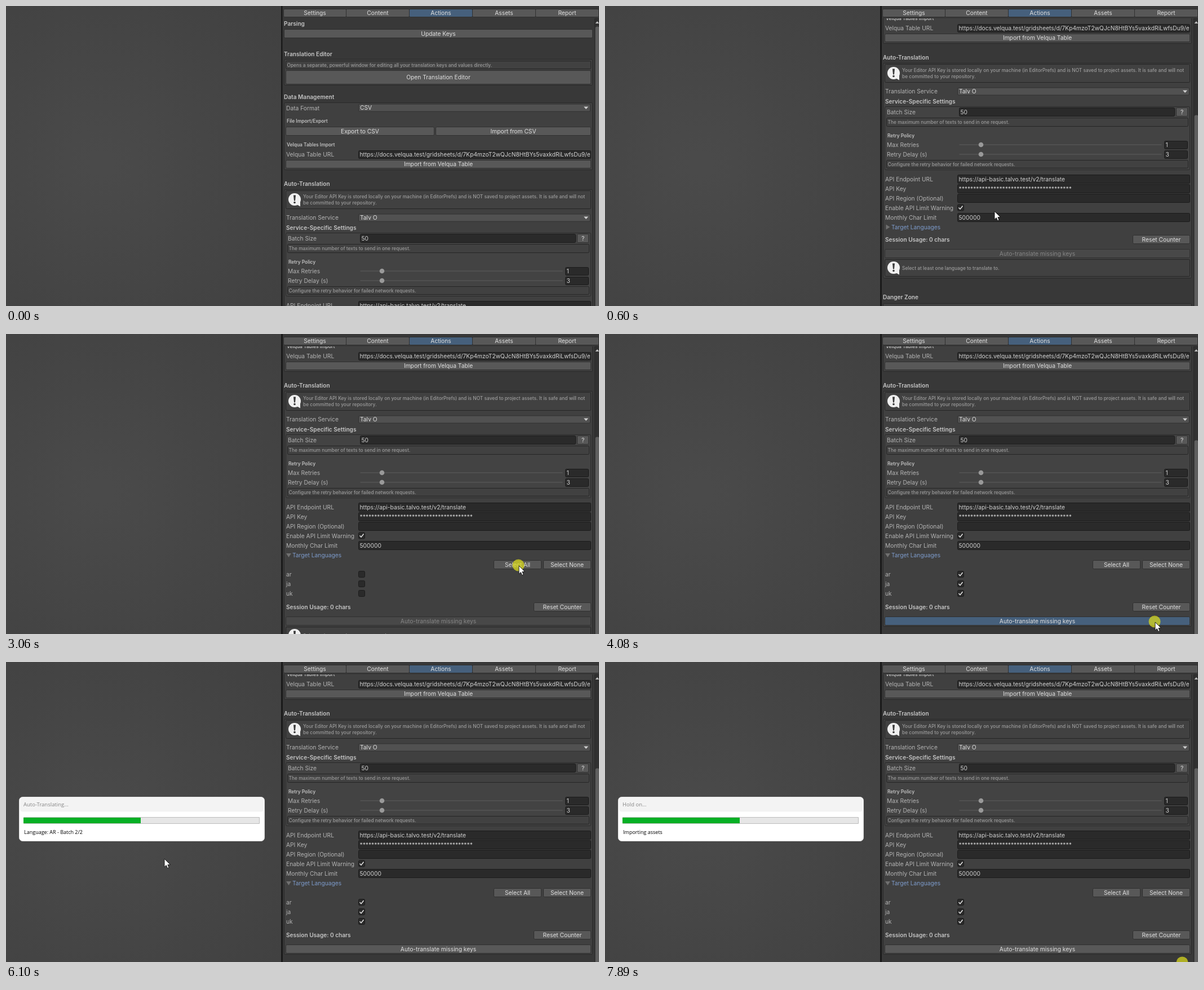
Animation of 1052 by 532 pixels, one loop 7940 ms. Source, as an HTML page with a canvas:

```html
<!DOCTYPE html>
<html lang="en">
<head>
<meta charset="utf-8">
<title>Auto-translation panel</title>
<style>
html, body { margin: 0; width: 100%; height: 100%; overflow: hidden; background: #383838; }
canvas { display: block; }
</style>
</head>
<body>
<canvas width="1052" height="532"></canvas>
<script>
const ctx = document.querySelector('canvas').getContext('2d');
const LOOP = 7940, SCROLL = 224;
const UI = 'Inter, sans-serif', SYS = '"Open Sans", sans-serif';
const LABEL = '#b4b4b4', BRIGHT = '#e0e0e0';

// Pointer moves: first change, last change, steps, destination, upward arc
const MOVES = [
  [100, 600, 10, 691, 364, 0],
  [1060, 1830, 16, 503, 374, 74],
  [1880, 1930, 2, 505.5, 395, 0],
  [2420, 3000, 11, 910, 411, 0],
  [3360, 4020, 13, 976, 511, 0],
  [4380, 5150, 16, 281, 349, 0],
  [6820, 7590, 16, 994, 523, 0],
  [7640, 7840, 4, 1025, 534, 0]
];
const CLICKS = [[2080, 2170], [3060, 3160], [4080, 4180], [5300, 5400], [7890, 7940]];

// Progress window states: start, title, message, bar fraction
const PROGRESS = [
  [5500, 'Auto-Translating...', 'Language: AR - Batch 1/2', 0],
  [6100, 'Auto-Translating...', 'Language: AR - Batch 2/2', .5],
  [6400, 'Hold on...', 'Importing assets', .5],
  [7000, 'Auto-Translating...', 'Language: JA - Batch 1/2', 0],
  [7300, 'Auto-Translating...', 'Language: JA - Batch 2/2', .5],
  [7690, 'Hold on...', 'Importing assets', .5]
];

const within = (t, a, b) => t >= a && t < b;
const ease = p => p * p * (3 - 2 * p);

function stepped(t, start, end, steps) {
  if (t < start) return 0;
  const k = Math.floor((t - start) / (end - start) * (steps - 1) + .001) + 1;
  return ease(Math.min(1, k / steps));
}

function pointerAt(t) {
  let x = 1025, y = 550;
  for (const [start, end, steps, toX, toY, arc] of MOVES) {
    if (t < start) break;
    const p = stepped(t, start, end, steps);
    x += (toX - x) * p;
    y += (toY - y) * p - arc * 4 * p * (1 - p);
  }
  return [x, y];
}

function box(x1, y1, x2, y2, fill, border, radius = 2) {
  ctx.beginPath();
  ctx.roundRect(x1 + .5, y1 + .5, x2 - x1 - 1, y2 - y1 - 1, radius);
  ctx.fillStyle = fill;
  ctx.fill();
  if (border) {
    ctx.strokeStyle = border;
    ctx.lineWidth = 1;
    ctx.stroke();
  }
}

// y is the middle of the capital letters
function text(str, x, y, color = LABEL, size = 10.25, weight = 400, align = 'left', family = UI) {
  ctx.font = `${weight} ${size}px ${family}`;
  ctx.textAlign = align;
  ctx.fillStyle = color;
  ctx.fillText(str, x, y + size * .36);
}

function polygon(color, ...points) {
  ctx.beginPath();
  for (let i = 0; i < points.length; i += 2) ctx.lineTo(points[i], points[i + 1]);
  ctx.closePath();
  ctx.fillStyle = color;
  ctx.fill();
}

function disc(x, y, r, color) {
  ctx.beginPath();
  ctx.arc(x, y, r, 0, 7);
  ctx.fillStyle = color;
  ctx.fill();
}

const heading = (str, x, y) => text(str, x, y, '#c6c6c6', 10.1, 600);
const miniHeading = (str, x, y) => text(str, x, y, '#c0c0c0', 8.4, 600);
const systemText = (str, x, y, size, color = '#000', align = 'left') =>
  text(str, x, y, color, size, 400, align, SYS);
const group = (y1, y2) => box(493, y1, 1041, y2, '#404040', '#292929');

function button(str, x1, y1, x2, y2, fill = '#585858', color = BRIGHT) {
  box(x1, y1, x2, y2, fill, '#303030');
  text(str, (x1 + x2) / 2, (y1 + y2) / 2, color, 10.25, 400, 'center');
}

function field(str, x1, y1, x2, y2) {
  box(x1, y1, x2, y2, '#2a2a2a', '#1b1b1b');
  ctx.save();
  ctx.beginPath();
  ctx.rect(x1, y1, x2 - x1 - 2, y2 - y1);
  ctx.clip();
  text(str, x1 + 2.5, (y1 + y2) / 2, '#d2d2d2');
  ctx.restore();
}

function dropdown(str, y) {
  box(625, y - 7, 1037, y + 7, '#515151', '#303030');
  text(str, 628, y, BRIGHT);
  polygon('#d0d0d0', 1025, y - 2, 1033, y - 2, 1029, y + 2.5);
}

function help(x1, y1, x2, y2, ...lines) {
  const icon = y2 - y1 > 20, mid = (y1 + y2) / 2;
  box(x1, y1, x2, y2, '#414141', '#252525');
  if (icon) {
    disc(512, mid - .5, 11, '#f0f0f0');
    polygon('#f0f0f0', 515, mid + 8, 522, mid + 4, 522, mid + 12);
    polygon('#383838', 510, mid - 8, 514, mid - 8, 513, mid + 2, 511, mid + 2);
    disc(512, mid + 5, 1.8, '#383838');
  }
  lines.forEach((line, i) =>
    text(line, icon ? 527 : x1 + 2.5, mid + (i - (lines.length - 1) / 2) * 10.5, '#9c9c9c', 8.4, 500));
}

function slider(label, y, value) {
  text(label, 500, y);
  box(628, y - 1, 988, y + 1, '#5e5e5e', null, 0);
  disc(667, y, 4.3, '#999');
  field(value, 992, y - 7, 1034, y + 8);
}

function checkbox(y, checked) {
  box(625, y - 6, 637, y + 6, '#2a2a2a', '#1b1b1b');
  if (!checked) return;
  ctx.beginPath();
  ctx.moveTo(627.5, y);
  ctx.lineTo(630, y + 2.7);
  ctx.lineTo(634.5, y - 3);
  ctx.strokeStyle = '#e6e6e6';
  ctx.lineWidth = 1.5;
  ctx.stroke();
}

function upperSections() {
  heading('Parsing', 493, 31.5);
  button('Update Keys', 493, 41, 1041, 57);
  heading('Translation Editor', 493, 85);
  group(94, 141);
  help(496, 97, 1038, 112, 'Opens a separate, powerful window for editing all your translation keys and values directly.');
  button('Open Translation Editor', 496, 114, 1038, 139);

  heading('Data Management', 493, 161);
  group(171, 291);
  text('Data Format', 497, 181);
  dropdown('CSV', 180.5);
  miniHeading('File Import/Export', 498, 204);
  button('Export to CSV', 496, 214, 760, 230);
  button('Import from CSV', 762, 214, 1038, 230);
  miniHeading('Velqua Tables Import', 498, 246);
  text('Velqua Table URL', 497, 263);
  field('https://docs.velqua.test/gridsheets/d/7Kp4mzoT2wQJcN8HtBYs5vaxkdRiLwfsDu9/e', 625, 256, 1038, 271);
  button('Import from Velqua Table', 496, 273, 1038, 288);
}

function translationSections(open, selected, pressed) {
  const shift = open ? 70 : 0;
  const bottom = open ? (selected ? 743 : 777) : 707;
  heading('Auto-Translation', 493, 315.5);
  group(325, bottom);
  help(496, 327, 1038, 360,
    'Your Editor API Key is stored locally on your machine (in EditorPrefs) and is NOT saved to project assets. It is safe and will not',
    'be committed to your repository.');
  text('Translation Service', 497, 375.5);
  dropdown('Talv O', 375.5);
  heading('Service-Specific Settings', 497, 393);
  box(496, 402, 1038, 515, '#434343', '#2a2a2a');
  text('Batch Size', 500, 412);
  field('50', 628, 404, 1011, 420);
  button('?', 1013, 404, 1034, 420);
  help(499, 422, 1035, 438, 'The maximum number of texts to send in one request.');
  miniHeading('Retry Policy', 501, 454);
  slider('Max Retries', 470, '1');
  slider('Retry Delay (s)', 487, '3');
  help(499, 497, 1035, 512, 'Configure the retry behavior for failed network requests.');

  text('API Endpoint URL', 497, 531);
  field('https://api-basic.talvo.test/v2/translate', 625, 523, 1038, 539);
  text('API Key', 497, 548);
  field('*'.repeat(39), 625, 540, 1038, 556);
  text('API Region (Optional)', 497, 565);
  field('', 625, 557, 1038, 573);
  text('Enable API Limit Warning', 497, 582);
  checkbox(581.5, true);
  text('Monthly Char Limit', 497, 599);
  field('500000', 625, 591, 1038, 607);
  if (open) polygon('#707070', 497, 613, 506, 613, 501.5, 620);
  else polygon('#707070', 498.5, 611.5, 505.5, 616, 498.5, 620.5);
  text('Target Languages', 508, 616, '#7d9bcb');
  if (open) {
    button('Select All', 865, 625, 950, 641);
    button('Select None', 953, 625, 1038, 641);
    ['ar', 'ja', 'uk'].forEach((code, i) => {
      text(code, 497, 650 + i * 17);
      checkbox(650 + i * 17, selected);
    });
  }
  heading('Session Usage: 0 chars', 497, 638 + shift);
  button('Reset Counter', 936, 630 + shift, 1038, 646 + shift);
  const [fill, color] = pressed ? ['#46607c', BRIGHT] : selected ? ['#585858', BRIGHT] : ['#484848', '#868686'];
  button('Auto-translate missing keys', 496, 655 + shift, 1038, 671 + shift, fill, color);
  if (!selected) help(496, 673 + shift, 1038, 704 + shift, 'Select at least one language to translate to.');
  heading('Danger Zone', 493, bottom + 33.5);
  group(bottom + 44, bottom + 100);
}

function panel(t) {
  const open = t >= 2170, selected = t >= 3160;
  const scroll = Math.round(SCROLL * stepped(t, 100, 600, 10));
  ctx.fillStyle = '#383838';
  ctx.fillRect(491, 0, 561, 532);
  ctx.fillStyle = '#1a1a1a';
  ctx.fillRect(488, 0, 2.5, 532);

  ctx.save();
  ctx.beginPath();
  ctx.rect(491, 22, 561, 510);
  ctx.clip();
  ctx.translate(0, -scroll);
  upperSections();
  translationSections(open, selected, within(t, 4080, 5500));
  ctx.restore();

  box(1044, 22, 1054, 540, '#313131', '#292929', 0);
  polygon('#c0c0c0', 1045.5, 31, 1052, 31, 1049, 27);
  const ratio = selected ? .679 : open ? .652 : .701;
  box(1045, 36 + Math.round(scroll * ratio), 1053, 560, '#5f5f5f', null, 3);

  const tabEdge = i => Math.round(491.5 + i * 111.8);
  ['Settings', 'Content', 'Actions', 'Assets', 'Report'].forEach((tab, i) =>
    button(tab, tabEdge(i), 5, tabEdge(i + 1) + 1, 20, i === 2 ? '#46607c' : '#585858'));
}

function viewport() {
  const glow = ctx.createRadialGradient(170, 280, 20, 170, 280, 440);
  glow.addColorStop(0, '#4a4a4a');
  glow.addColorStop(1, '#404040');
  ctx.fillStyle = glow;
  ctx.fillRect(0, 0, 489, 532);
}

function dialog(x, y) {
  const hover = x > 254 && x < 323 && y > 340 && y < 358;
  box(73, 186, 408, 372, '#f0f0f0', '#e4e4e4');
  box(73, 187, 407, 212, '#f9f9f9', null, 1);
  systemText('Confirm Translation', 80, 199, 9.5);
  box(390, 192, 407, 209, '#c75050', null, 0);
  systemText('x', 398.5, 199.5, 9, '#fff', 'center');
  box(87, 222, 142, 277, '#000', null, 0);
  [['You are about to translate 68 unique texts into 3', 227],
   ["languages using the 'TalvO' service.", 238],
   ['Estimated for this batch: 3 492 characters.', 260],
   ['Used this session: 0 characters.', 271],
   ['Total after this batch will be approx. 3 492 characters.', 293],
   ['Your monthly limit is 500 000 characters.', 315]
  ].forEach(([line, lineY]) => systemText(line, 163, lineY, 8.9));
  box(254, 340, 323, 358, hover ? '#cce4f7' : '#fdfdfd', '#0067b8');
  systemText('Yes, translate', 288, 349, 9.3, '#000', 'center');
  box(331, 340, 394, 358, '#fdfdfd', '#d0d0d0');
  systemText('Cancel', 361.5, 349, 9.3, '#000', 'center');
}

function progressWindow(title, message, amount) {
  box(23, 239, 459, 318, '#fff', '#ddd', 6);
  box(24, 240, 458, 266, '#f3f3f3', null, 5);
  systemText(title, 31, 252.5, 9.5, '#858585');
  box(31, 275, 450, 287, '#e6e6e6', '#bcbcbc', 0);
  if (amount) {
    ctx.fillStyle = '#06b025';
    ctx.fillRect(31, 276, 416 * amount, 10);
  }
  systemText(message, 32, 301.5, 9);
}

function pointer(x, y, clicking) {
  if (clicking) disc(x - 1, y - 1, 10.5, 'rgba(215,215,30,.75)');
  ctx.save();
  ctx.translate(x, y);
  polygon('#fff', 0, 0, 0, 14.5, 3.3, 11.5, 5.6, 16.7, 8, 15.6, 5.9, 10.6, 10.5, 10.4);
  ctx.strokeStyle = '#111';
  ctx.lineWidth = .9;
  ctx.stroke();
  ctx.restore();
}

function draw(now) {
  const t = now % LOOP;
  const [x, y] = pointerAt(t);
  viewport();
  panel(t);
  if (within(t, 4180, 5400)) dialog(x, y);
  const state = PROGRESS.filter(([start]) => t >= start).pop();
  if (state) progressWindow(...state.slice(1));
  pointer(x, y, CLICKS.some(([a, b]) => within(t, a, b)));
  requestAnimationFrame(draw);
}

requestAnimationFrame(draw);
</script>
</body>
</html>
```
